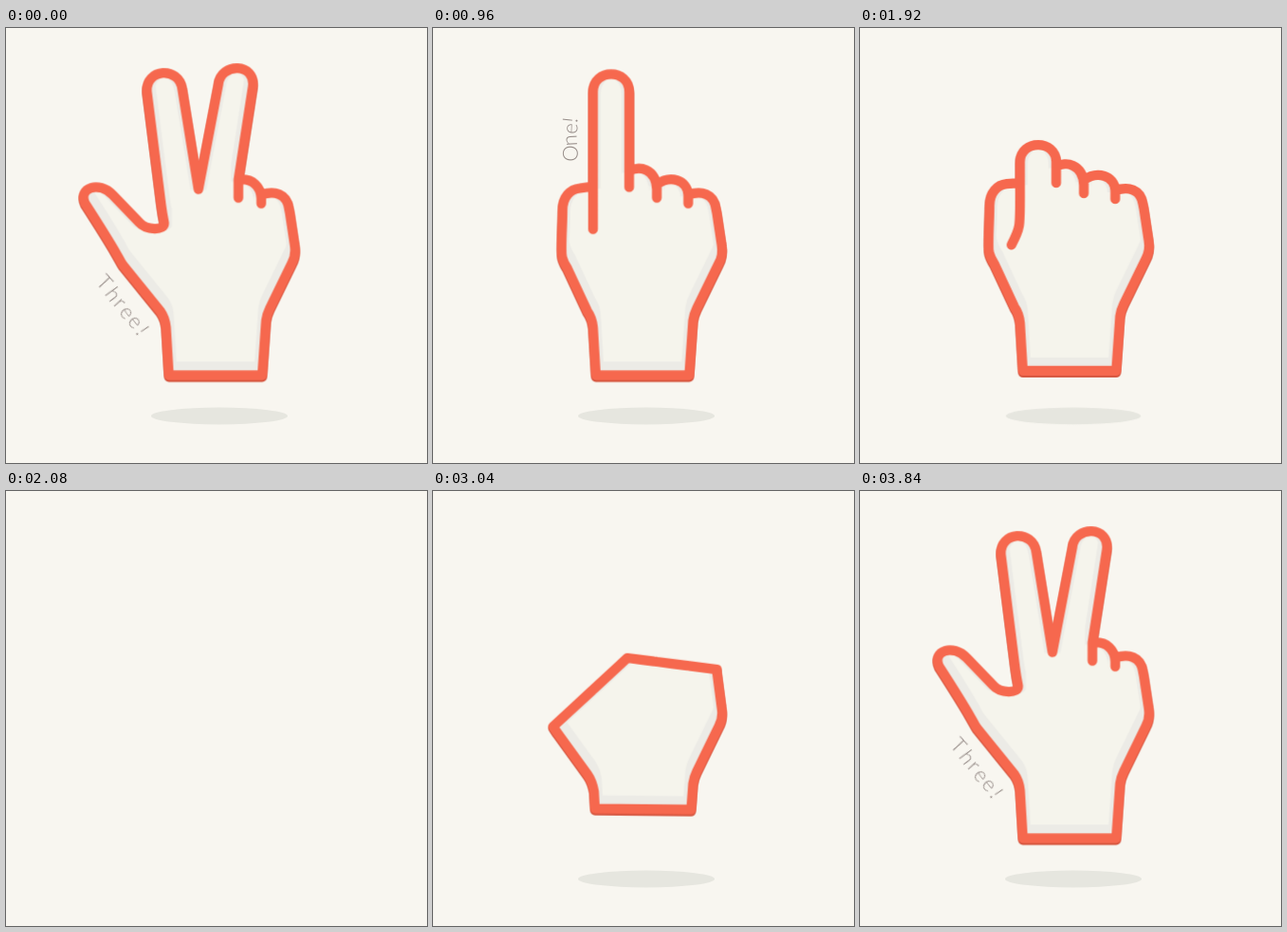
Animation of 444x458 px, one loop 4.4 s. Source, as an HTML page without scripts:

```html
<!DOCTYPE html>
<html lang="en">
<head>
<meta charset="utf-8">
<title>Counting hand</title>
<style>
  html, body { margin: 0; width: 100%; height: 100%; overflow: hidden; background: #f8f6f0; }
  svg { display: block; width: 100%; height: 100%; }

  .hand, .pose, .shadow, .label { animation: 4.4s linear infinite; }

  .edge { filter: drop-shadow(0 2.5px 0 #d5553f); }
  .hand { transform-origin: 225px 235px; animation-name: move; }
  .pose { stroke-linejoin: round; animation-name: pose; }
  .skin { fill: #ecebe6; filter: url(#inner); }
  .line { fill: none; stroke: #f6684e; stroke-width: 10.2; }
  .shadow { fill: #e6e6df; transform-origin: 225px 408.5px; animation-name: shadow; }
  .label { font: 300 22px Lato, sans-serif; fill: #958b87; text-anchor: middle; }
  .three { letter-spacing: 2.4px; animation-name: three; }
  .two { animation-name: two; }
  .one { animation-name: one; }

  /* Jump out of the top, then spin in as a square */
  @keyframes move {
    0% { transform: translateY(0) rotate(0deg) scale(1.004); }
    43.25% { transform: translateY(0) rotate(0deg) scale(1.004); animation-timing-function: cubic-bezier(.55, .055, .675, .19); }
    47.27%, 52.72% { transform: translateY(-390px) rotate(0deg) scale(1.004); }
    52.73% { transform: translateY(0) rotate(-80deg) scale(0); animation-timing-function: ease-out; }
    59.09% { transform: translateY(0) rotate(11deg) scale(1.004); animation-timing-function: ease-out; }
    65.45%, 100% { transform: translateY(0) rotate(0deg) scale(1.004); }
  }

  @keyframes shadow {
    0% { transform: scale(1); }
    43.25% { transform: scale(1); animation-timing-function: cubic-bezier(.55, .055, .675, .19); }
    47.27%, 52.73% { transform: scale(0); animation-timing-function: ease-out; }
    59.09% { transform: scale(.937); }
    65.45%, 100% { transform: scale(1); }
  }

  @keyframes pose {
    /* thumb, index and middle */
    0%, .6%, 85%, 100% {
      d: path("M172 365 L169 315 Q168 305 163 298 L124 250 C121 246 120 243 117 238 C106 219 95 202 84 185 C76 168 99 161 113 176 L141 205 C148 213 168 214 167 205 C166 200 165 195 164 187 L149 68 C147 43 183 41 186 65 L203 170 L224 60 C226 37 264 37 260 63 L245 160 L245 179 L245 160 C260 158 269 168 269 180 L269 185 L269 176 C283 171 296 175 298 190 L299 195 L304 228 Q306 239 301 248 L278 295 Q275 301 274 308 L270 365 Z");
      animation-timing-function: ease-in-out;
    }
    /* index and middle */
    9.5%, 17.5% {
      d: path("M172 365 L169 315 Q168 305 163 298 L142 253 C135 242 136 238 136 230 C136 215 137 205 137 192 C137 178 145 170 153 169 L162 168 C164 183 166 198 168 212 C166 198 164 183 162 168 L149 68 C147 43 183 41 186 65 L203 170 L224 60 C226 37 264 37 260 63 L245 160 L245 179 L245 160 C260 158 269 168 269 180 L269 185 L269 176 C283 171 296 175 298 190 L299 195 L304 228 Q306 239 301 248 L278 295 Q275 301 274 308 L270 365 Z");
      animation-timing-function: ease-out;
    }
    /* index */
    21.82%, 32.9% {
      d: path("M172 365 L169 315 Q168 305 163 298 L142 253 C135 242 136 238 136 230 C136 215 137 205 137 192 C137 178 145 170 155 169 L169 167 C169 182 169 197 169 212 C169 197 169 182 169 167 L169 68 C169 43 207 43 207 68 L207 168 L207 151 C217 145 235 148 236 170 L236 175 L236 179 L236 165 C250 155 268 160 269 176 L269 185 L269 176 C283 171 296 175 298 190 L299 195 L304 228 Q306 239 301 248 L278 295 Q275 301 274 308 L270 365 Z");
      animation-timing-function: ease-out;
    }
    /* fist */
    36.36%, 47.3% {
      d: path("M172 365 L169 315 Q168 305 163 298 L142 253 C135 242 136 238 136 230 C136 215 137 205 137 192 C137 178 145 170 155 169 L169 168 C169 215 170 214 160 233 C170 214 169 215 169 168 L169 146 C169 122 207 122 207 146 L207 168 L207 151 C217 145 235 148 236 170 L236 175 L236 179 L236 165 C250 155 268 160 269 176 L269 185 L269 176 C283 171 296 175 298 190 L299 195 L304 228 Q306 239 301 248 L278 295 Q275 301 274 308 L270 365 Z");
      animation-timing-function: step-end;
    }
    /* square */
    52%, 59.09% {
      d: path("M165 295 L165 290 Q165 286 165 280 L165 262 C165 258 165 252 165 248 C165 248 165 248 165 248 C165 248 165 248 165 248 L165 230 C165 225 165 222 165 220 C165 218 165 215 165 212 L165 205 C165 198 165 190 165 182 L165 175 L165 175 C175 175 190 175 200 175 L202 175 L204 175 L206 175 C215 175 230 175 245 175 L246 175 L247 175 C260 175 275 175 285 175 L285 190 L285 225 Q285 235 285 245 L285 280 Q285 284 285 288 L285 295 Z");
      animation-timing-function: ease-out;
    }
    /* bare palm */
    69.3% {
      d: path("M171 334 L170 316 Q168 305 163 298 L131 254 C129 251 128 250 127 248 C127 248 127 248 127 248 C127 248 127 248 127 248 L150 226.8 C156 221.2 162 215.7 168 210.2 C168 210.2 168 210.2 168 210.2 L170 208.3 C179 200 188 191.7 197 183.4 L205 176 L205 176 C214 177.1 224 178.4 233 179.6 L234 179.7 L235 179.8 L236 180 C246 181.2 258 182.8 268 184 L269 184.2 L270 184.3 C279 185.4 289 186.7 299 188 L299 190 L304 228 Q306 239 301 248 L278 295 Q275 301 274 308 L272 335 Z");
      animation-timing-function: ease-in-out;
    }
    /* four fingers */
    76.36% {
      d: path("M172 365 L169 315 Q168 305 163 298 L131 254 C129 251 128 250 127 248 C127 248 127 248 127 248 C127 248 127 248 127 248 L150 226 C156 220 162 215 168 209 C168 203 168 197 168 190 L166 68 C166 45 187 45 196 50 L196 169 L196 57 C196 32 233 32 233 58 L233 100 L233 179 L235 68 C243 57 269 58 269 85 L269 185 L269 103 C280 95 299 98 299 122 L299 187 L304 228 Q306 239 301 248 L278 295 Q275 301 274 308 L270 365 Z");
      animation-timing-function: ease-in-out;
    }
    /* thumb starts to push out */
    78.18% {
      d: path("M172 365 L169 315 Q168 305 163 298 L129 253 C127 250 125 247 124 245 C122 242 121 240 119 236 C117 231 121 229 124 232 L146 221 C154 217 164 216 168 209 C168 203 168 197 167 190 L164 68 C164 45 186 45 194 52 L197 169 L197 57 C198 32 235 32 235 58 L234 106 L234 179 L236 82 C245 71 269 72 269 97 L269 185 L269 113 C280 105 299 108 299 130 L299 188 L304 228 Q306 239 301 248 L278 295 Q275 301 274 308 L270 365 Z");
      animation-timing-function: ease-out;
    }
  }

  @keyframes three {
    0%, .6% { opacity: 1; }
    3%, 84% { opacity: 0; }
    87%, 100% { opacity: 1; }
  }
  @keyframes two {
    0%, 8% { opacity: 0; }
    10.9%, 17.5% { opacity: 1; }
    19.5%, 100% { opacity: 0; }
  }
  @keyframes one {
    0%, 19.5% { opacity: 0; }
    21.8%, 32.9% { opacity: 1; }
    35%, 100% { opacity: 0; }
  }
</style>
</head>
<body>
<svg viewBox="0 0 444 458">
  <defs>
    <!-- Light skin pulled in from the edge and lifted, leaving a soft inner band -->
    <filter id="inner" filterUnits="userSpaceOnUse" x="0" y="-20" width="444" height="500" color-interpolation-filters="sRGB">
      <feMorphology in="SourceAlpha" operator="erode" radius="8"/>
      <feOffset dy="-6" result="core"/>
      <feFlood flood-color="#f5f4ec"/>
      <feComposite in2="core" operator="in" result="light"/>
      <feMerge>
        <feMergeNode in="SourceGraphic"/>
        <feMergeNode in="light"/>
      </feMerge>
    </filter>
  </defs>

  <ellipse class="shadow" cx="225" cy="408.5" rx="72" ry="9"/>

  <g class="edge">
    <g class="hand">
      <path class="pose skin"/>
      <path class="pose line"/>
    </g>
  </g>

  <g transform="translate(123 293) rotate(51)"><text class="label three" y="7" rotate="-4 3 -3 4 -2 6">Three!</text></g>
  <g transform="translate(298 95) rotate(75)"><text class="label two" y="7" rotate="-4 3 -3 6">Two!</text></g>
  <g transform="translate(145 118) rotate(-90)"><text class="label one" y="7" rotate="4 -3 3 6">One!</text></g>
</svg>
</body>
</html>
```
